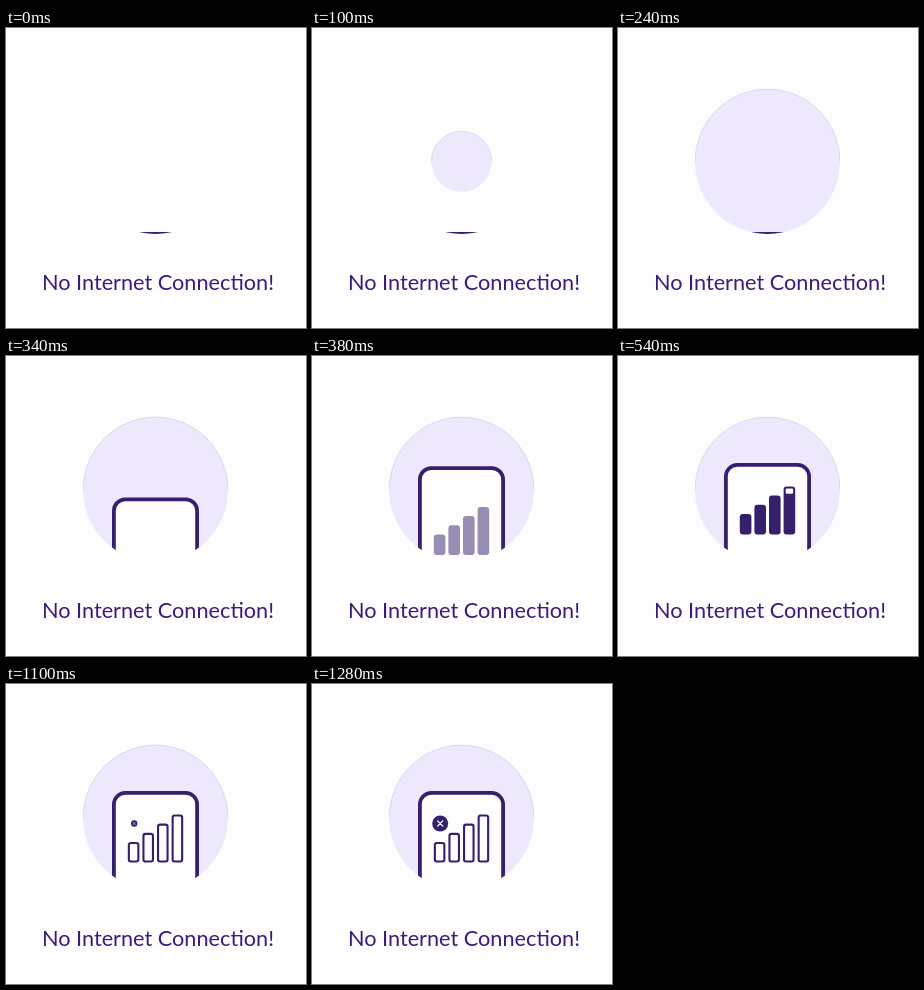
An HTML page for the animation above (1.5 s loop, 300 by 300 pixels).

```html
<!DOCTYPE html>
<html lang="en">
<head>
<meta charset="utf-8">
<title>No Internet Connection</title>
<style>
  html, body { margin: 0; height: 100%; overflow: hidden; background: #fdfdfd; }
  svg { display: block; width: 100%; height: 100%; }
  text { font: 21.7px Lato, sans-serif; fill: #3a1c7c; text-anchor: middle; }
  .ink { fill: #35206b; }
  .paper { fill: #fdfdfd; }
</style>
</head>
<body>
<svg viewBox="0 0 300 300">
  <defs>
    <clipPath id="disc"><circle cx="149.5" cy="133.5" r="72.5"/></clipPath>
    <path id="frame" d="M107.9 230V120.4a11.5 11.5 0 0 1 11.5-11.5h60.2a11.5 11.5 0 0 1 11.5 11.5V230"/>
  </defs>
  <g id="backdrop">
    <circle r="72.5" fill="#eee8fd"/>
    <path d="M-72.3 0a72.3 72.3 0 0 1 144.6 0" fill="none" stroke="#cfc6e6" stroke-width=".6" vector-effect="non-scaling-stroke"/>
  </g>
  <g id="screen"><use href="#frame" class="paper"/></g>
  <g clip-path="url(#disc)">
    <g id="outline"><use href="#frame" fill="none" stroke="#35206b" stroke-width="3.8"/></g>
    <g id="bars"></g>
  </g>
  <g id="badge">
    <circle r="8" class="ink"/>
    <path d="M-2.6-2.6 2.6 2.6M2.6-2.6-2.6 2.6" stroke="#fdfdfd" stroke-width="1.3" stroke-linecap="round"/>
  </g>
  <text x="152" y="262">No Internet Connection!</text>
</svg>
<script>
  const LOOP = 1500, STEP = 20;
  const BAR_BOTTOM = 178.6, BAR_WIDTH = 11.6, WALL = 2.1;
  const DRAIN_START = 528, DRAIN_TIME = 100;
  const $ = id => document.getElementById(id);
  const progress = (t, from, to) => Math.min(1, Math.max(0, (t - from) / (to - from)));
  const move = (id, transform) => $(id).setAttribute('transform', transform);

  function addRect(className, attributes) {
    const rect = document.createElementNS('http://www.w3.org/2000/svg', 'rect');
    rect.setAttribute('class', className);
    for (const name in attributes) rect.setAttribute(name, attributes[name]);
    return $('bars').appendChild(rect);
  }

  const bars = [20.6, 29.8, 39, 48.2].map((height, i) => {
    const x = 121.8 + 14.6 * i, y = BAR_BOTTOM - height;
    addRect('ink', { x, y, width: BAR_WIDTH, height, rx: 3 });
    const hollow = addRect('paper', { x: x + WALL, y: y + WALL, width: BAR_WIDTH - 2 * WALL, rx: 1.2 });
    return { hollow, depth: height - 2 * WALL, start: DRAIN_START + (3 - i) * DRAIN_TIME };
  });

  function draw(t) {
    move('backdrop', `translate(149.5 133.5) scale(${progress(t, 0, 240)})`);

    const rise = `translate(0 ${97 * (1 - progress(t, 260, 384))})`;
    move('screen', rise);
    move('outline', rise);

    const arrive = progress(t, 340, 420);
    move('bars', `translate(0 ${41 * (1 - arrive)})`);
    $('bars').setAttribute('opacity', arrive);
    for (const { hollow, depth, start } of bars)
      hollow.setAttribute('height', depth * progress(t, start, start + DRAIN_TIME));

    // The badge pops past its size, then settles.
    const scale = 1.2 * progress(t, 1065, 1170) - 0.2 * progress(t, 1170, 1275);
    move('badge', `translate(128.2 139.5) scale(${scale})`);
  }

  function tick() {
    draw(Math.floor(performance.now() % LOOP / STEP) * STEP);
    requestAnimationFrame(tick);
  }
  tick();
</script>
</body>
</html>
```
